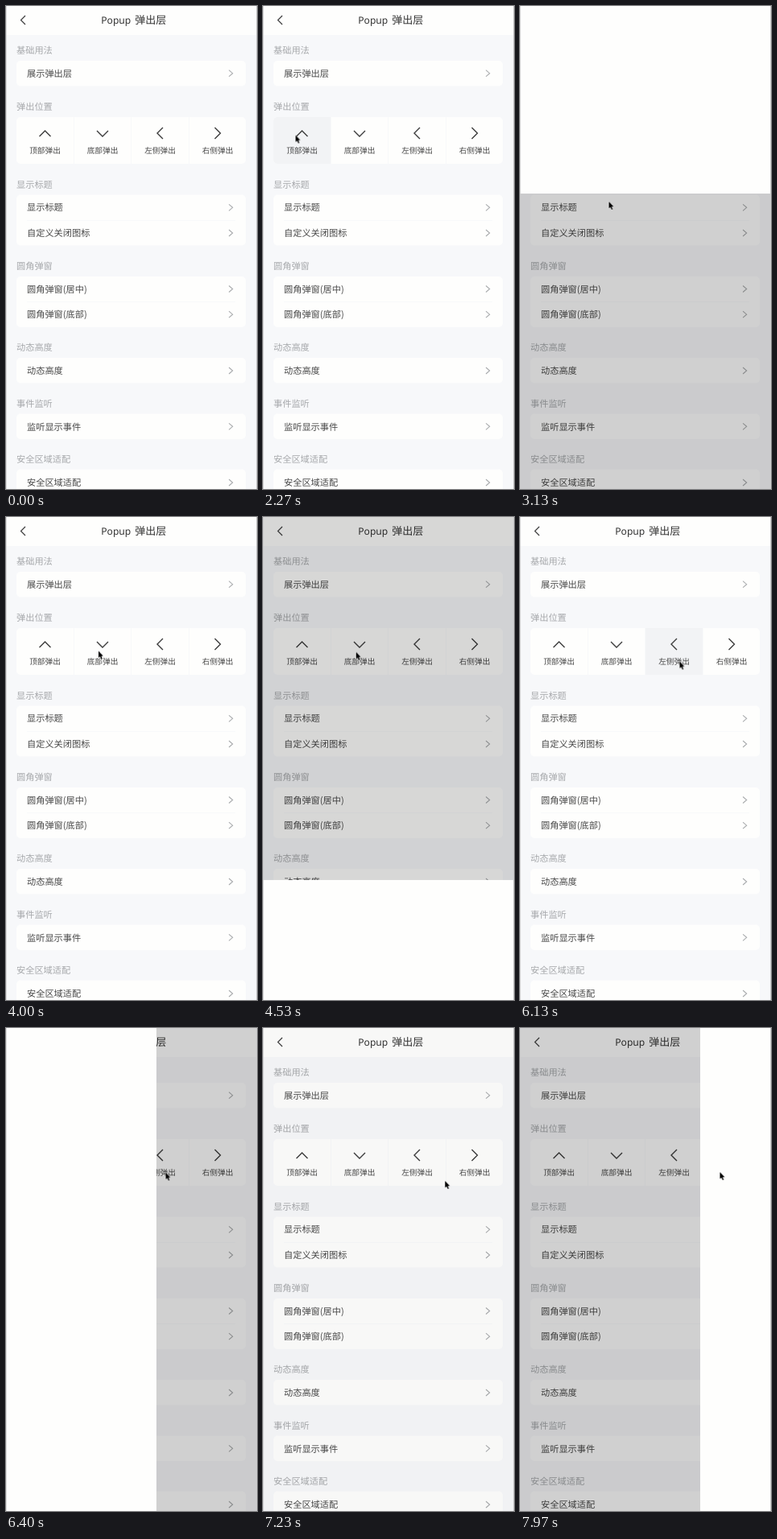
Animation, 312 px wide and 600 px high, one loop 8000 ms. Source, as an HTML page:

```html
<!DOCTYPE html>
<html lang="zh-CN">
<head>
<meta charset="utf-8">
<title>Popup 弹出层</title>
<style>
html, body { margin: 0; width: 100%; height: 100%; overflow: hidden; background: #f7f8fa; }
#stage { position: absolute; left: 0; top: 0; width: 312px; height: 600px; overflow: hidden; }
#stage > * { position: absolute; }
svg { display: block; left: 0; top: 0; }
text { font-family: "Noto Sans CJK SC", "Noto Sans CJK", "Noto Sans", sans-serif; font-size: 11.2px; fill: #484848; text-rendering: geometricPrecision; }
.head { font-size: 13px; fill: #333; }
.latin { font-family: "Noto Sans", "Open Sans", sans-serif; font-size: 12.1px; font-weight: 500; }
.label text { fill: #a6a8ab; }
.grid text { font-size: 9.7px; text-anchor: middle; }
.card { fill: #fefefd; }
.rule { stroke: #f8f9fa; }
.arrow { fill: none; stroke: #3c3c3c; stroke-width: 1.4; }
.more { fill: none; stroke: #a9abad; stroke-width: 1.1; }

.shade { inset: 0; background: #000; opacity: 0; animation: shade 8s linear infinite; }
.panel { background: #fefefd; }
.top { left: 0; top: -233px; width: 312px; height: 233px; animation: top 8s infinite; }
.bottom { left: 0; top: 600px; width: 312px; height: 233px; animation: bottom 8s infinite; }
.left { left: -187px; top: 0; width: 187px; height: 600px; animation: left 8s infinite; }
.right { left: 312px; top: 0; width: 187px; height: 600px; animation: right 8s infinite; }
.top, .bottom, .left { animation-timing-function: ease-out; }
.edge { top: 0; width: 1px; height: 600px; background: #d0d0d1; }
.press { fill: #f2f3f5; opacity: 0; animation: press 8s step-end infinite; }
.cursor { visibility: hidden; animation: show 8s step-end infinite, move 8s ease-in-out infinite; }

@keyframes press { 0% { opacity: 1; } 1.875%, 100% { opacity: 0; } }
@keyframes shade {
  0%, 29.125%, 47.5%, 55.375%, 69.125%, 77.375%, 90.875%, 97.875% { opacity: 0; }
  30.625%, 43.125%, 56.875%, 65.375%, 78.875%, 87.125%, 99.375%, 100% { opacity: .18; }
}
@keyframes top {
  0%, 29.125%, 45%, 100% { transform: none; }
  31.625%, 42.5% { transform: translateY(233px); }
}
@keyframes bottom {
  0%, 55.375%, 65.72%, 100% { transform: none; }
  58.125%, 64.125% { transform: translateY(-233px); }
}
@keyframes left {
  0%, 77.5%, 88.375%, 100% { transform: none; }
  80%, 85.875% { transform: translateX(187px); }
}
@keyframes right {
  0%, 98.5% { transform: none; animation-timing-function: ease-in; }
  99.625%, 100% { transform: translateX(-88px); }
}
@keyframes show { 0% { visibility: hidden; } 7.5%, 100% { visibility: visible; } }
@keyframes move {
  0%, 7.5% { transform: translate(296px, 208px); }
  17.5%, 17.875% { transform: translate(65.5px, 182.5px); }
  20.375%, 33.75% { transform: translate(40.5px, 160.5px); }
  39.125%, 45% { transform: translate(110.5px, 243px); }
  50%, 56.25% { transform: translate(115px, 166.5px); }
  60.375%, 68.125% { transform: translate(157.5px, 237.5px); }
  73.375%, 80% { transform: translate(198.5px, 179.5px); }
  82.5%, 88.75% { transform: translate(222px, 192px); }
  94.625%, 100% { transform: translate(248.5px, 179px); }
}
</style>
</head>
<body>
<div id="stage">
  <svg width="312" height="600" viewBox="0 0 312 600">
    <defs>
      <path id="more" d="M-2.4-4 2.2 0-2.4 4"/>
      <path id="up" d="M-7 3.5 0-3.5 7 3.5"/>
      <clipPath id="round"><rect x="13" y="138" width="285" height="58" rx="5"/></clipPath>
    </defs>
    <rect width="312" height="600" fill="#f7f8fa"/>
    <rect class="card" width="312" height="36"/>
    <path class="arrow" d="M24 12 18.5 17.5 24 23" style="stroke-width:1.2"/>
    <text class="head latin" x="118.3" y="21.8">Popup</text>
    <text class="head" x="160.3" y="22">弹出层</text>

    <g class="card">
      <rect x="13" y="68" width="285" height="31.5" rx="5"/>
      <rect x="13" y="138" width="285" height="58" rx="5"/>
      <rect x="13" y="234.5" width="285" height="63" rx="5"/>
      <rect x="13" y="336" width="285" height="63" rx="5"/>
      <rect x="13" y="437" width="285" height="31.5" rx="5"/>
      <rect x="13" y="506.5" width="285" height="31.5" rx="5"/>
      <rect x="13" y="575.5" width="285" height="31.5" rx="5"/>
    </g>

    <g clip-path="url(#round)">
      <rect class="press" x="13" y="138" width="71.5" height="58" style="animation-delay:2.27s"/>
      <rect class="press" x="84.5" y="138" width="71.5" height="58" style="animation-delay:4.33s"/>
      <rect class="press" x="156" y="138" width="71" height="58" style="animation-delay:6.1s"/>
      <rect class="press" x="227" y="138" width="71" height="58" style="animation-delay:7.73s"/>
    </g>
    <path class="rule" d="M84.5 138v58M155.5 138v58M227.5 138v58M26 266.5h259M26 367.5h259"/>

    <g class="label">
      <text x="13" y="59.2">基础用法</text>
      <text x="13" y="129">弹出位置</text>
      <text x="13" y="225.7">显示标题</text>
      <text x="13" y="327">圆角弹窗</text>
      <text x="13" y="428.2">动态高度</text>
      <text x="13" y="497.8">事件监听</text>
      <text x="13" y="567.2">安全区域适配</text>
    </g>

    <g class="arrow">
      <use href="#up" x="48.5" y="158.5"/>
      <use href="#up" transform="translate(120 158.5) rotate(180)"/>
      <use href="#up" transform="translate(191.5 158) rotate(-90)"/>
      <use href="#up" transform="translate(263 158) rotate(90)"/>
    </g>
    <g class="grid">
      <text x="48.5" y="183.3">顶部弹出</text>
      <text x="120" y="183.3">底部弹出</text>
      <text x="191.5" y="183.3">左侧弹出</text>
      <text x="263" y="183.3">右侧弹出</text>
    </g>

    <text x="26" y="87.8">展示弹出层</text>
    <text x="26" y="254.4">显示标题</text>
    <text x="26" y="286">自定义关闭图标</text>
    <text x="26" y="355.8">圆角弹窗(居中)</text>
    <text x="26" y="387.3">圆角弹窗(底部)</text>
    <text x="26" y="457">动态高度</text>
    <text x="26" y="526.5">监听显示事件</text>
    <text x="26" y="596">安全区域适配</text>
    <g class="more">
      <use href="#more" x="279.5" y="83.7"/>
      <use href="#more" x="279.5" y="250.3"/>
      <use href="#more" x="279.5" y="282"/>
      <use href="#more" x="279.5" y="351.5"/>
      <use href="#more" x="279.5" y="383.2"/>
      <use href="#more" x="279.5" y="453"/>
      <use href="#more" x="279.5" y="522.3"/>
      <use href="#more" x="279.5" y="592"/>
    </g>
  </svg>

  <div class="shade"></div>
  <div class="panel top"></div>
  <div class="panel bottom"></div>
  <div class="panel left"></div>
  <div class="panel right"></div>
  <div class="edge" style="left:0;opacity:.7"></div>
  <div class="edge" style="left:311px"></div>

  <svg class="cursor" width="9" height="12.6" viewBox="0 0 10 14" overflow="visible">
    <path d="M0 0V9.4L2.1 7.5 3.7 11.2 5.3 10.5 3.8 6.9H6.6Z" fill="#000" stroke="#fff" stroke-width=".8" paint-order="stroke"/>
  </svg>
</div>
</body>
</html>
```
